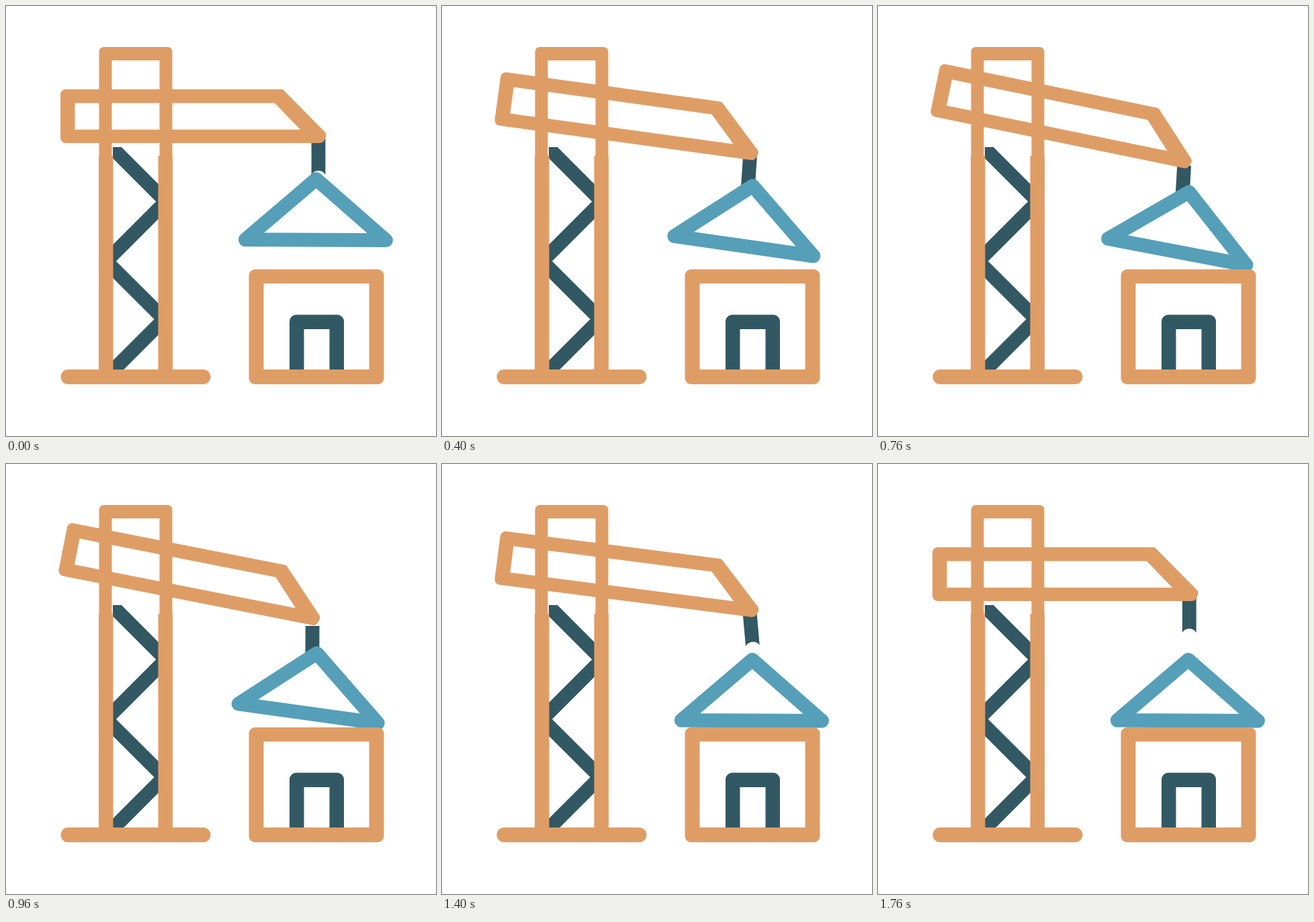
Recreate the animation shown at these times as an HTML page with a canvas. Size 640 px wide and 640 px high, loop 2 s.

```html
<!DOCTYPE html>
<html lang="en">
<head>
<meta charset="utf-8">
<title>Crane</title>
<style>
html, body { margin: 0; width: 100%; height: 100%; overflow: hidden; background: #fff; }
canvas { display: block; width: 640px; height: 640px; }
</style>
</head>
<body>
<canvas id="stage" width="640" height="640"></canvas>
<script>
const ctx = document.getElementById('stage').getContext('2d');
const ORANGE = '#df9d66', DARK = '#325863', BLUE = '#559fb9';
const LOOP = 2000, STEP = 40, LOW = 600, SEATED = 1360, END = 1760;

// Progress from 0 to 1 between two times
const span = (t, a, b) => Math.max(0, Math.min(1, (t - a) / (b - a)));

// Corners are [x, y, radius]
function corners(pts) {
  const n = pts.length, last = pts[n - 1];
  ctx.moveTo((last[0] + pts[0][0]) / 2, (last[1] + pts[0][1]) / 2);
  pts.forEach(([x, y, r = 0], i) => {
    const next = pts[(i + 1) % n];
    ctx.arcTo(x, y, next[0], next[1], r);
  });
  ctx.closePath();
}

function shape(color, ...outlines) {
  ctx.beginPath();
  outlines.forEach(corners);
  ctx.fillStyle = color;
  ctx.fill('evenodd');
}

function box(x1, y1, x2, y2, r = 0) {
  return [[x1, y1, r], [x2, y1, r], [x2, y2, r], [x1, y2, r]];
}

function line(color, width, join, pts, close) {
  ctx.beginPath();
  pts.forEach(([x, y]) => ctx.lineTo(x, y));
  if (close) ctx.closePath();
  ctx.strokeStyle = color;
  ctx.lineWidth = width;
  ctx.lineJoin = join;
  ctx.stroke();
}

function placed(x, y, deg, draw) {
  ctx.save();
  ctx.translate(x, y);
  ctx.rotate(deg * Math.PI / 180);
  draw();
  ctx.restore();
}

function tower() {
  ctx.save();
  ctx.beginPath();
  ctx.rect(159, 210, 69, 332);
  ctx.clip();
  line(DARK, 21, 'miter', [[150, 203], [238, 291], [149.1, 379.9], [235.4, 466.1], [150, 551.5]]);
  ctx.restore();
  shape(ORANGE, box(138.5, 61, 247.5, 310, 7), box(157.5, 81, 228.5, 310));
  shape(ORANGE, box(138, 223, 159.5, 545), box(226.5, 223, 248, 545));
  shape(ORANGE, box(81.5, 541, 304.5, 563, 10.9));
}

function house() {
  shape(DARK, box(422, 459.5, 503, 560, 10), box(443.5, 481, 481.5, 560));
  shape(ORANGE, box(361.5, 392, 562.5, 563, 9), box(383.5, 413, 540.5, 541));
}

function jib(t) {
  const deg = 11.7 * (span(t, 0, LOW) - span(t, LOW, END) ** 2.63);
  placed(278, 164, deg, () => {
    shape(ORANGE,
      [[-197, -40, 8], [134, -40, 5], [200, 27, 8], [194, 40, 8], [-197, 40, 8]],
      [[-175.5, -19.5], [122, -19.5], [160, 20], [-175.5, 20]]
    );
  });
}

function cable(t) {
  const down = span(t, 0, LOW);
  const x = 465 - 12.3 * down + 10.6 * span(t, LOW, END);
  const y = 224 + 37 * down + 7 * span(t, LOW, 960) - 44 * span(t, 960, END);
  const deg = 5.6 * (down - 2 * span(t, LOW, SEATED) + span(t, SEATED, END));
  placed(x, y, deg, () => {
    const half = 10.4, a = Math.asin(half / 12);
    ctx.beginPath();
    ctx.moveTo(-half, -27);
    ctx.lineTo(half, -27);
    ctx.arc(0, 33, 12, a - Math.PI / 2, -a - Math.PI / 2, true);
    ctx.fillStyle = DARK;
    ctx.fill();
  });
}

function roof(t) {
  const down = span(t, 0, LOW);
  const tilt = down - span(t, LOW, 1330) ** 1.47;
  const drop = 14.3 * down + 19.4 * span(t, LOW, SEATED);
  placed(461 - 8.2 * tilt, 303 + drop, 11.8 * tilt, () => {
    line(BLUE, 20.8, 'round', [[0.8, -45.3], [-104.7, 44.7], [104.5, 45.7]], true);
  });
}

function draw(t) {
  ctx.fillStyle = '#fff';
  ctx.fillRect(0, 0, 640, 640);
  tower();
  cable(t);
  jib(t);
  roof(t);
  house();
}

const start = performance.now();
function tick() {
  const t = Math.max(0, performance.now() - start) % LOOP;
  draw(Math.floor(t / STEP) * STEP);
  requestAnimationFrame(tick);
}
tick();
</script>
</body>
</html>
```
